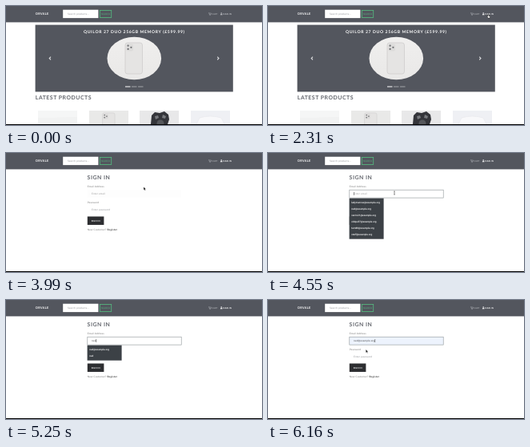
An HTML page for the animation above (6370 ms loop, 320x149 px).

```html
<!DOCTYPE html>
<html lang="en">
<head>
<meta charset="utf-8">
<title>Shop sign in</title>
<style>
  html, body { margin: 0; height: 100%; overflow: hidden; background: #fff; }
  svg { display: block; width: 100vw; height: 100vh; }
  text { font: 3.1px Lato, sans-serif; letter-spacing: .16px; fill: #777; text-rendering: geometricPrecision; }
  .heading { font-size: 6.9px; font-weight: 700; letter-spacing: .52px; fill: #63666d; }
  .title { font-size: 5.1px; font-weight: 700; letter-spacing: .64px; fill: #fff; }
  .brand { font-size: 3.9px; font-weight: 700; letter-spacing: .3px; fill: #fff; }
  .caps { font-size: 2.7px; letter-spacing: .18px; }
  .nav { fill: #c3c5c9; }
  .nav text { fill: inherit; }
  .hint { fill: #8f9196; }
  .bold { font-weight: 700; }
  #menu text { font: 500 3.05px Roboto, sans-serif; letter-spacing: 0; fill: #fff; }
</style>
</head>
<body>
<svg viewBox="0 0 320 149" preserveAspectRatio="none">
  <defs>
    <linearGradient id="studio" x2="0" y2="1">
      <stop stop-color="#f0efee"/><stop offset="1" stop-color="#e9e8e7"/>
    </linearGradient>
    <g id="phone">
      <rect x="-11" y="-19.5" width="21.500" height="39" rx="3" fill="#e5e4e3" stroke="#c6c5c4" stroke-width=".6"/>
      <rect x="-9.6" y="-18" width="8.6" height="9" rx="2.2" fill="#dcdbda"/>
      <g fill="#6c6d70">
        <circle cx="-7.4" cy="-15.8" r="1.1"/><circle cx="-7.4" cy="-11.6" r="1.1"/><circle cx="-3.6" cy="-13.7" r="1.1"/>
      </g>
    </g>
    <clipPath id="cards"><path d="M40 131h49v17h-49zM104 131h49v17h-49zM167 131h49v17h-49zM231 131h49v17h-49z"/></clipPath>
  </defs>

  <rect width="320" height="20.4" fill="#53565e"/>
  <text class="brand" x="36.8" y="11.3">ORVALE</text>
  <rect x="71.2" y="4.7" width="44.2" height="10.4" fill="#fff"/>
  <text class="hint" x="77" y="10.9">Search products...</text>
  <rect x="117.3" y="5.5" width="14.4" height="9" fill="none" stroke="#55bd80" stroke-width=".8"/>
  <text class="caps" x="124.6" y="10.9" text-anchor="middle" style="fill:#55bd80">SEARCH</text>
  <g class="nav">
    <path d="M253 8.6h.7l.5 1.9h1.8l.4-1.5h-2.4M254.2 11.3h1.8" fill="none" stroke="#c3c5c9" stroke-width=".4"/>
    <text class="caps" x="257" y="10.9">CART</text>
  </g>
  <g class="nav" id="account">
    <circle cx="269.2" cy="9" r=".8"/><path d="M267.8 11.2q0-1.3 1.4-1.3t1.4 1.3z"/>
    <text class="caps bold" x="271" y="10.9">SIGN IN</text>
  </g>

  <g id="home">
    <rect x="36.6" y="23.6" width="247.2" height="83.8" fill="#53565e"/>
    <text class="title" x="160.3" y="34.2" text-anchor="middle">QUILOR 27 DUO 256GB MEMORY (£599.99)</text>
    <ellipse cx="160.3" cy="65.5" rx="33.8" ry="26.7" fill="url(#studio)"/>
    <use href="#phone" x="160" y="65.5"/>
    <path d="M56 63.6l-1.8 1.9 1.8 1.9M264.2 63.6l1.8 1.9-1.8 1.9" fill="none" stroke="#dcdde0" stroke-width="1.1"/>
    <path d="M149 101h6.5" stroke="#fff"/>
    <path d="M157 101h6.5M165 101h6.5" stroke="#a3a5a9"/>
    <text class="heading" x="36.8" y="116.6">LATEST PRODUCTS</text>
    <g clip-path="url(#cards)">
      <path d="M40 131h49v17h-49z" fill="#f5f6f6"/>
      <path d="M40 140l49-1v9h-49z" fill="#f1f2f2"/>
      <path d="M104 131h49v17h-49z" fill="#e9e9e8"/>
      <use href="#phone" transform="translate(128.5 148) scale(.72)"/>
      <path d="M167 131h49v17h-49z" fill="#e8e8e9"/>
      <path d="M181 148l1-11 4-4 6 1 6-2 5 4 1 6-2 6z" fill="#34353a"/>
      <path d="M186 138l4-1 1 3-4 2zM196 136l4 2-1 3-4-1z" fill="#77797d"/>
      <circle cx="193" cy="147" r="4.5" fill="#56585c"/>
      <path d="M231 131h49v17h-49z" fill="#eff0f4"/>
      <path d="M238 148l4-8q13-4 27 0l4 8z" fill="#f8f8fa" stroke="#e2e3e7" stroke-width=".5"/>
    </g>
  </g>

  <g id="login">
    <text class="heading" x="101.6" y="33.3">SIGN IN</text>
    <text x="101.8" y="43.2">Email Address</text>
    <rect id="field" x="101.8" y="46.2" width="117.4" height="9.9" stroke-width=".6"/>
    <text id="email" x="107" y="52.2"></text>
    <rect id="caret" y="49" width=".5" height="4" fill="#333"/>
    <text x="101.8" y="63.1">Password</text>
    <text class="hint" x="107" y="72.1">Enter password</text>
    <rect x="101.8" y="79.5" width="20.6" height="10.5" fill="#2d2e31"/>
    <text class="caps bold" x="112.2" y="85.7" text-anchor="middle" style="fill:#fff">SIGN IN</text>
    <text x="101.8" y="97.1">New Customer? <tspan class="bold" fill="#444">Register</tspan></text>
    <g id="menu">
      <rect id="panel" x="101.6" y="56.7" width="43" fill="#3c4146"/>
      <rect id="hover" x="101.6" y="58" width="43" height="8" fill="#5d6266"/>
    </g>
  </g>

  <rect y="148" width="320" height="1"/>
  <g id="cursor">
    <path id="arrow" d="M0 0v4l1-.9.7 1.4.7-.3-.7-1.4h1.2z" fill="#111" stroke="#fff" stroke-width=".25"/>
    <path id="hand" d="M1 0v2.2l-1-.2.2 1 1 1.500h2l.5-2-1.8-.6v-1.9z" fill="#fff" stroke="#111" stroke-width=".4"/>
    <path id="beam" d="M-.8 0h1.6M0 0v4M-.8 4h1.6" fill="none" stroke="#222" stroke-width=".5"/>
  </g>
</svg>
<script>
const LOOP = 6370, TICK = 70;
const ADDRESS = 'ned@example.org';
const ALL = ['ladymarrow@example.org', ADDRESS, 'verrin21@example.org',
  'oldquill7@example.org', 'tarn88@example.org', 'staff@example.org'];
const MATCHES = [ADDRESS, 'ned'];

// Pointer waypoints: time, x, y
const PATH = [
  [560, 201, 113], [630, 219, 99], [700, 232, 88], [910, 232, 88],
  [1190, 248.3, 48.7], [1400, 277, 24], [1890, 277, 24], [2310, 274, 10.6],
  [3290, 274, 10.6], [3640, 186, 37], [3780, 186, 37], [4200, 158, 48],
  [5460, 158, 48], [5880, 122.3, 62], [LOOP, 122.3, 62]
];

const $ = id => document.getElementById(id);
const show = (id, on) => { $(id).style.display = on ? '' : 'none'; };
const between = (t, a, b) => t >= a && t < b;

const rows = ALL.map((_, i) => {
  const row = document.createElementNS('http://www.w3.org/2000/svg', 'text');
  row.setAttribute('x', 104.2);
  row.setAttribute('y', 63.1 + i * 8);
  return $('menu').appendChild(row);
});

function pointerAt(t) {
  const i = Math.max(1, PATH.findIndex(p => p[0] >= t));
  const [t0, x0, y0] = PATH[i - 1], [t1, x1, y1] = PATH[i];
  const k = Math.max(0, (t - t0) / (t1 - t0));
  return [x0 + (x1 - x0) * k, y0 + (y1 - y0) * k];
}

function drawPointer(t) {
  const hand = between(t, 2240, 3360);
  const beam = between(t, 4130, 5600);
  $('cursor').setAttribute('transform', `translate(${pointerAt(t)})`);
  show('cursor', t >= 560 && !between(t, 5040, 5530));
  show('hand', hand);
  show('beam', beam);
  show('arrow', !hand && !beam);
}

function drawForm(t) {
  const focused = t >= 4550, preview = t >= 5740;
  const typed = t < 5040 ? '' : preview ? ADDRESS : 'ned'.slice(0, 1 + (t - 5040) / TICK);
  const items = typed ? MATCHES : ALL;

  $('field').setAttribute('fill', preview ? '#edf3fd' : focused ? '#fff' : '#fdfdfd');
  $('field').setAttribute('stroke', focused ? '#8d9497' : 'none');
  $('email').textContent = typed || 'Enter email';
  $('email').style.fill = typed ? '#444' : '#999';
  $('caret').setAttribute('x', 107 + (typed ? $('email').getComputedTextLength() : 0));
  show('caret', between(t, 4410, 4900) || between(t, 5040, 5740) || t >= 6160);

  show('menu', between(t, 4550, 6090));
  show('hover', preview);
  $('panel').setAttribute('height', items.length * 8 + 3);
  rows.forEach((row, i) => { row.textContent = items[i] || ''; });
}

function frame(now) {
  const t = Math.floor(now % LOOP / TICK) * TICK;
  show('home', t < 3010);
  show('login', t >= 3010);
  $('account').style.fill = t >= 2240 ? '#fff' : '';
  drawPointer(t);
  drawForm(t);
  requestAnimationFrame(frame);
}
frame(performance.now());
</script>
</body>
</html>
```
